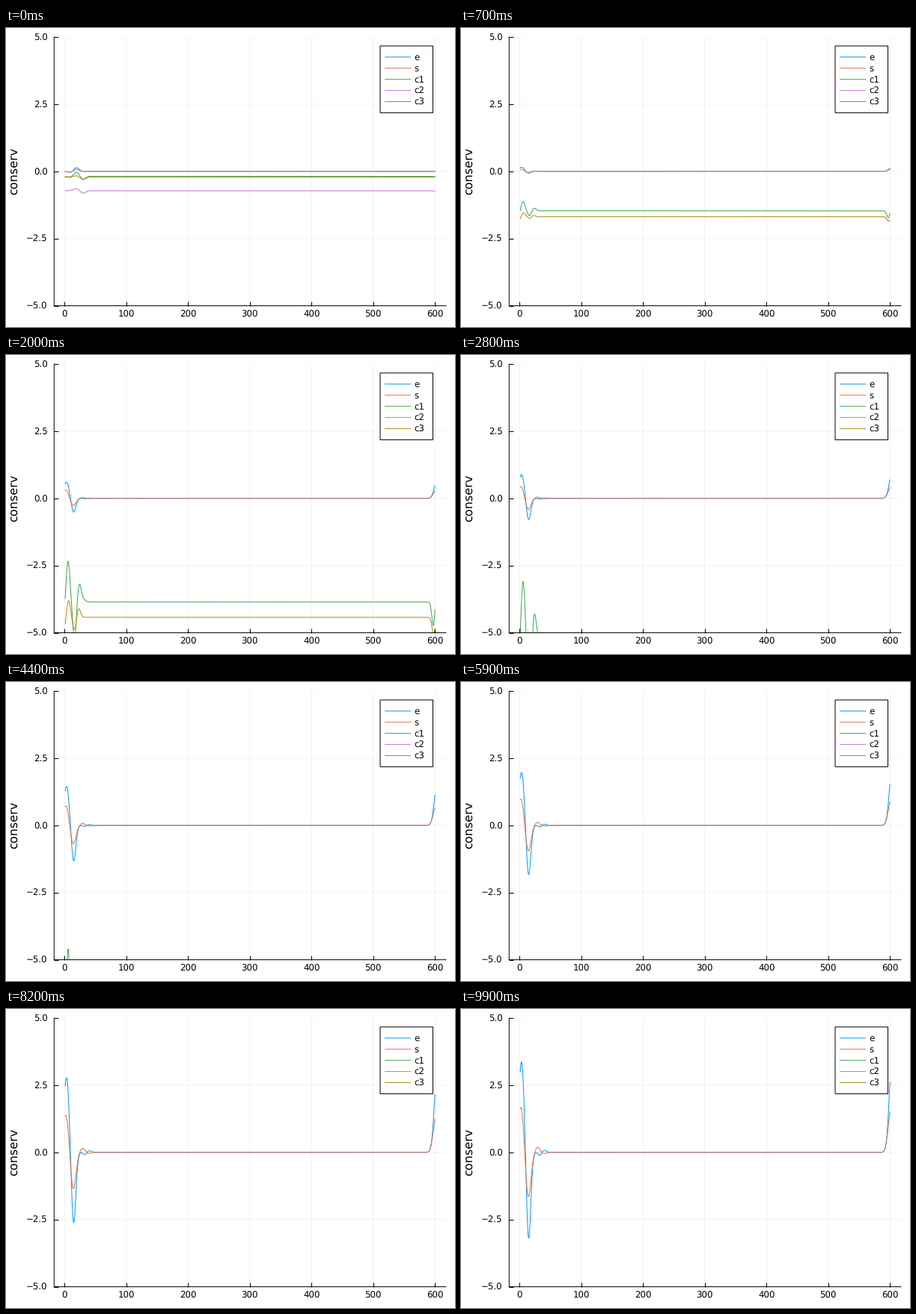
These frames come from a looping animation (600x400 px, 10000 ms). A matplotlib script:

```python
import numpy as np
import matplotlib.pyplot as plt
from matplotlib.animation import FuncAnimation
from matplotlib.patches import Rectangle

W, H, DPI = 600, 400, 100
FRAMES, STEP = 100, 100
PT = 72 / DPI  # points per pixel
N = 600
SETTLE = 3.0  # decay of the starting ripple, in frames

plt.rcParams.update({"font.family": "DejaVu Sans", "text.hinting": "none"})
x = np.arange(1, N + 1)


def bump(center, width):
    """Gaussian pulse on the periodic domain."""
    d = (x - center + N / 2) % N - N / 2
    return np.exp(-.5 * (d / width) ** 2)


def ramp(n, center):
    """Linear growth that sets in later for pulses further right."""
    lag = min(2 + .2 * center, 5)
    return np.log1p(np.exp(n - lag))


class Curve:
    def __init__(self, drift, ripple, pulses):
        self.drift = drift
        self.ripple = sum(a * bump(c, 4) for a, c in zip(ripple, (9, 19, 30)))
        self.pulses = [(c, rate * bump(c, w)) for rate, c, w in pulses]

    def at(self, n):
        grown = sum(ramp(n, c) * shape for c, shape in self.pulses)
        return self.drift * (n + 1) + self.ripple * np.exp(-n / SETTLE) + grown


# Each pulse: growth per frame, center, width
echo = [(.038, 6.5, 2.8), (-.031, 16, 2.8), (.0225, 23, 2.8), (-.0325, -2, 2.8)]
series = [
    ("e", "#009AFA", Curve(0, (-.04, .14, 0), [
        (.0353, 3.2, 4.4), (-.0353, 14.5, 3.6),
        (-.0012, 32.5, 2.2), (.0008, 40.5, 3)])),
    ("s", "#E36F47", Curve(0, (-.03, .08, 0), [
        (.0177, 2.2, 4.6), (-.0182, 14, 4.3),
        (.0021, 29, 3.3), (-.0005, 40, 3)])),
    ("c1", "#3EA44E", Curve(-.1834, (-.05, .16, -.11), [
        (.0905, 5.6, 3), (-.093, 16, 2.8), (.0455, 24, 3),
        (.0055, 31, 3), (-.05, -2.5, 2.5)])),
    ("c2", "#C371D2", Curve(-.7225, (.01, .09, -.09),
                            [(1.5 * r, c, w) for r, c, w in echo])),
    ("c3", "#AC8E18", Curve(-.2107, (.01, .045, -.095), echo)),
]

fig = plt.figure(figsize=(W / DPI, H / DPI), dpi=DPI, facecolor="white")

left, right, top, bottom = 64.3, 588, 12, 371.6
ax = fig.add_axes([left / W, 1 - bottom / H, (right - left) / W, (bottom - top) / H])
margin = .03 * (N - 1)
ax.set_xlim(1 - margin, N + margin)
ax.set_ylim(-5, 5)
ax.set_xticks(range(0, N + 1, 100))
yticks = np.linspace(-5, 5, 5)
ax.set_yticks(yticks, [f"{v:.1f}".replace("-", "\u2212") for v in yticks])
ax.tick_params(direction="in", length=6 * PT, width=PT, labelsize=11.7 * PT)
ax.tick_params(axis="x", pad=6.5 * PT)
ax.tick_params(axis="y", pad=8.8 * PT)
ax.grid(color="black", alpha=.1, lw=.5 * PT, snap=False)
ax.set_axisbelow(True)
ax.spines[["top", "right"]].set_visible(False)
for side in ("left", "bottom"):
    ax.spines[side].set(linewidth=PT, snap=False)

lines = [ax.plot(x, 0 * x, color=col, lw=PT, snap=False)[0]
         for _, col, _ in series]

# Legend and axis label, in pixel coordinates
panel = fig.add_axes([0, 0, 1, 1], zorder=5)
panel.set_xlim(0, W)
panel.set_ylim(H, 0)
panel.axis("off")
row = 14.9
panel.add_patch(Rectangle((500, 24), 70.5, row * (len(series) + 1), fc="white",
                          ec="black", lw=PT, snap=False))
for k, (name, col, _) in enumerate(series, 1):
    y = 24 + row * k
    panel.plot([506, 541], [y, y], color=col, lw=PT, solid_capstyle="butt",
               snap=False)
    panel.text(545.5, y + 4.4, name, size=11.7 * PT, va="baseline")
panel.text(16, 191.3, "conserv", size=16.1 * PT, rotation=90, ha="center",
           va="baseline", rotation_mode="anchor")


def draw(n):
    for line, (_, _, curve) in zip(lines, series):
        line.set_ydata(curve.at(n))
    return lines


anim = FuncAnimation(fig, draw, frames=FRAMES, interval=STEP, repeat=True,
                     repeat_delay=0)
plt.show()
```
